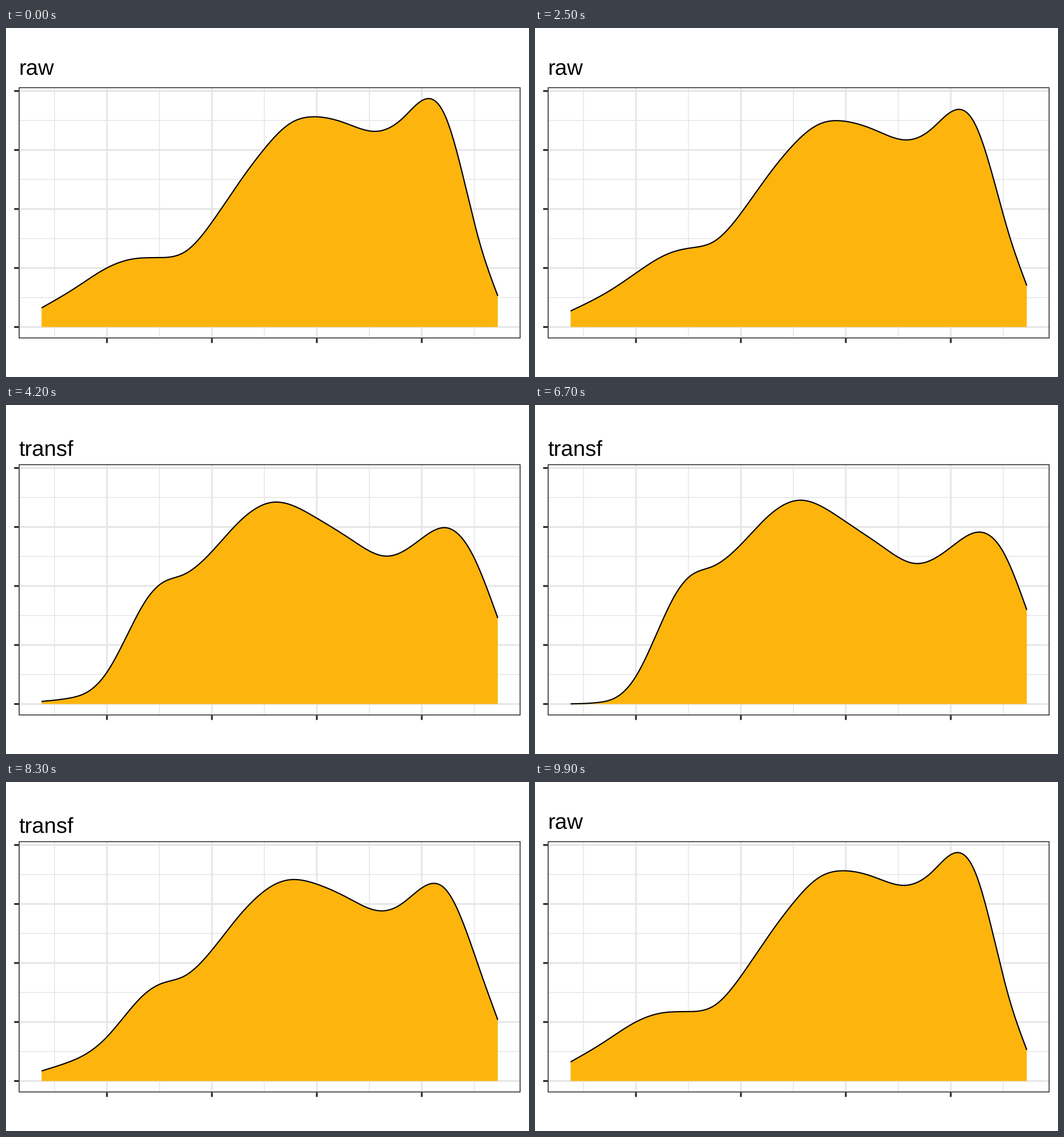
A matplotlib script that plays this animation: 917x611 px, repeating every 10000 ms.

```python
import numpy as np
import matplotlib.pyplot as plt
from matplotlib.animation import FuncAnimation
from matplotlib.patches import Polygon, Rectangle

plt.rcParams["text.hinting"] = "no_hinting"

WIDTH, HEIGHT, DPI = 917, 611, 100
FRAMES, INTERVAL = 100, 100
BASE_SIZE = 32                      # theme font size in pixels
MAJOR = BASE_SIZE * 0.097           # theme line width in pixels
LEFT, RIGHT, TOP, BOTTOM = 22.3, 902.2, 103.7, 543.4
START, END, BASELINE = 62.4, 862.3, 523.5
X_STEP, Y_STEP = 184, 103.3
GRID, DARK, FILL = "#e6e6e6", "#262626", "#fdb40d"
TITLES = {"raw": 81.7, "transf": 89}

# Peaks, valleys and bends of the two densities.
RAW = [
    (START, 490), (120, 456), (177, 420), (223, 404.2), (269, 402),
    (315, 391), (361, 340), (407, 273), (453, 211.5), (499, 166.5),
    (541, 155.4), (595, 166.5), (649, 180.9), (695, 158.5), (739, 123.6),
    (771, 156), (800, 254), (830, 374), (END, 469),
]
TRANSFORMED = [
    (START, 523.3), (110, 521), (145, 510.3), (177, 475), (213, 401),
    (245, 333.5), (275, 297), (310, 283), (361, 244), (410, 193.5),
    (465, 166.6), (505, 179), (545, 204.5), (607, 246.5), (669, 277.8),
    (729, 249.5), (779, 222.6), (821, 257), (END, 358.5),
]


def spline(points, x):
    """Natural cubic spline through the points, evaluated at x."""
    px, py = np.array(points, float).T
    h, slope = np.diff(px), np.diff(py) / np.diff(px)
    n = len(px)
    system, rhs = np.eye(n), np.zeros(n)
    for i in range(1, n - 1):
        system[i, i - 1:i + 2] = h[i - 1], 2 * (h[i - 1] + h[i]), h[i]
        rhs[i] = 6 * (slope[i] - slope[i - 1])
    m = np.linalg.solve(system, rhs)
    i = np.clip(np.searchsorted(px, x) - 1, 0, n - 2)
    a, b = px[i + 1] - x, x - px[i]
    return ((m[i] * a**3 + m[i + 1] * b**3) / (6 * h[i])
            + (py[i] / h[i] - m[i] * h[i] / 6) * a
            + (py[i + 1] / h[i] - m[i + 1] * h[i] / 6) * b)


def px_to_pt(pixels):
    return pixels * 72 / DPI


def segment(x, y, width, color, z):
    ax.plot(x, y, color=color, lw=px_to_pt(width), zorder=z,
            solid_capstyle="butt", snap=False)


def ease(t):
    return (1 - np.cos(np.pi * np.clip(t, 0, 1))) / 2


def blend(frame):
    """Share of the transformed shape in a frame."""
    if frame <= 50:
        return ease((frame - 16) / 34)
    return 1 - ease((frame - 66) / 33)


fig = plt.figure(figsize=(WIDTH / DPI, HEIGHT / DPI), dpi=DPI, facecolor="white")
ax = fig.add_axes([0, 0, 1, 1])
ax.set_xlim(0, WIDTH)
ax.set_ylim(HEIGHT, 0)
ax.axis("off")

major_x = 177 + X_STEP * np.arange(4)
major_y = BASELINE - Y_STEP * np.arange(5)
for x in 85 + X_STEP * np.arange(5):
    segment([x, x], [TOP, BOTTOM], MAJOR / 2, GRID, 1)
for y in major_y[:4] - Y_STEP / 2:
    segment([LEFT, RIGHT], [y, y], MAJOR / 2, GRID, 1)
for x in major_x:
    segment([x, x], [TOP, BOTTOM], MAJOR, GRID, 2)
    segment([x, x], [BOTTOM, BOTTOM + BASE_SIZE / 4], MAJOR, DARK, 6)
for y in major_y:
    segment([LEFT, RIGHT], [y, y], MAJOR, GRID, 2)
    segment([LEFT - BASE_SIZE / 4, LEFT], [y, y], MAJOR, DARK, 6)

# Only the inner half of the panel border is visible.
inset = MAJOR / 4
ax.add_patch(Rectangle((LEFT + inset, TOP + inset), RIGHT - LEFT - 2 * inset,
                       BOTTOM - TOP - 2 * inset, fill=False, ec=DARK,
                       lw=px_to_pt(MAJOR / 2), joinstyle="miter",
                       snap=False, zorder=5))

xs = np.linspace(START, END, 512)
raw_curve, transformed_curve = spline(RAW, xs), spline(TRANSFORMED, xs)
area = Polygon([(0, 0), (1, 1)], fc=FILL, ec="none", lw=0, snap=False, zorder=3)
ax.add_patch(area)
outline, = ax.plot([], [], color="black", lw=px_to_pt(2.15), zorder=4,
                   solid_capstyle="butt", snap=False)
title = ax.text(LEFT, 0, "", family="Liberation Sans", color="black",
                size=px_to_pt(1.2 * BASE_SIZE), ha="left", va="baseline")


def update(frame):
    ys = raw_curve + (transformed_curve - raw_curve) * blend(frame)
    outline.set_data(xs, ys)
    base = [(END, BASELINE), (START, BASELINE)]
    area.set_xy(np.vstack([np.column_stack([xs, ys]), base]))
    name = "transf" if 34 <= frame < 84 else "raw"
    title.set_text(name)
    title.set_y(TITLES[name])
    return area, outline, title


animation = FuncAnimation(fig, update, frames=FRAMES, interval=INTERVAL,
                          repeat=True, repeat_delay=0)
plt.show()
```
